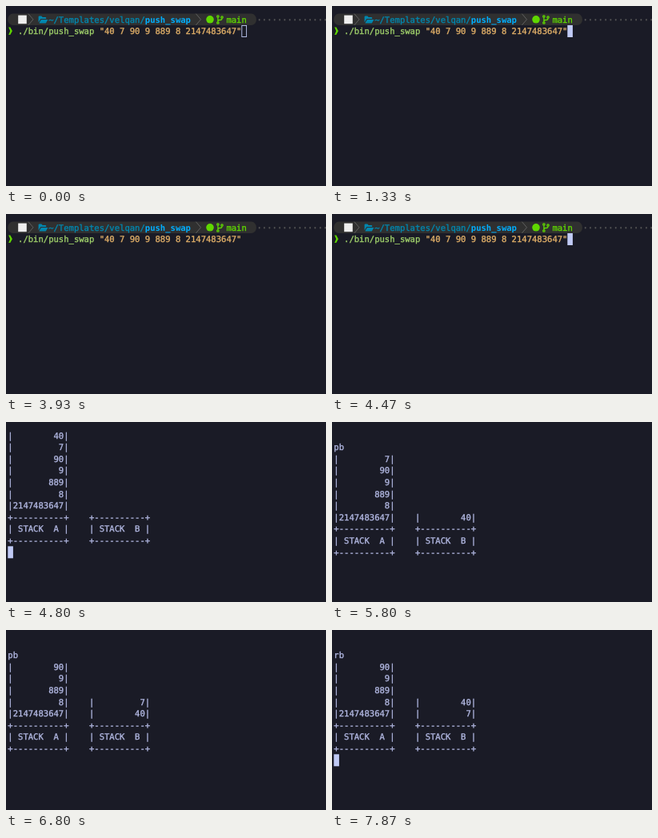
An HTML page that plays this animation: 400 by 225 pixels, repeating every 8000 ms.

```html
<!DOCTYPE html>
<html lang="en">
<head>
<meta charset="utf-8">
<title>push_swap in a terminal</title>
<style>
  html, body { margin: 0; width: 100%; height: 100%; overflow: hidden; background: #1a1b26; }
  svg { display: block; width: 100vw; height: 100vh; }
  text {
    font: 10.55px "DejaVu Sans Mono", "Noto Sans Mono", monospace;
    color: #b2b8e2;
    stroke: currentColor;
    stroke-width: .35;
    text-rendering: geometricPrecision;
  }
  text, path { fill: currentColor; }
  .path { color: #0087af; }
  .dir { color: #00afff; font-weight: bold; stroke: none; }
  .git { color: #5fd700; }
  .cmd { color: #9ece6a; }
  .str { color: #e0af68; }
  .dot { color: #585858; }
  .line { fill: none; stroke: currentColor; stroke-width: 1.3; }
  .sep { fill: none; stroke: #6c6c6c; stroke-width: .8; }
  .cursor { fill: #c0caf5; }
  .hollow { fill: none; stroke: #c0caf5; stroke-width: .9; }

  .scene, .blink { opacity: 0; animation: 8s step-end infinite; }
  #prompt { animation-name: prompt; }
  #step0 { animation-name: step0; }
  #step1 { animation-name: step1; }
  #step2 { animation-name: step2; }
  #step3 { animation-name: step3; }
  #idle { animation-name: idle; }
  #typing { animation-name: typing; }
  #upper { animation-name: upper; }
  #lower { animation-name: lower; }

  @keyframes prompt { 0% { opacity: 1 } 60%, 100% { opacity: 0 } }
  @keyframes step0 { 0%, 72.5%, 100% { opacity: 0 } 60% { opacity: 1 } }
  @keyframes step1 { 0%, 85%, 100% { opacity: 0 } 72.5% { opacity: 1 } }
  @keyframes step2 { 0%, 97.5%, 100% { opacity: 0 } 85% { opacity: 1 } }
  @keyframes step3 { 0% { opacity: 0 } 97.5%, 100% { opacity: 1 } }
  @keyframes idle { 0% { opacity: 1 } 16.625%, 100% { opacity: 0 } }
  @keyframes typing {
    0%, 24.125%, 36.625%, 49.125%, 60%, 100% { opacity: 0 }
    16.625%, 30.875%, 43.375%, 55.875% { opacity: 1 }
  }
  @keyframes upper {
    0%, 67.5%, 92.5% { opacity: 0 }
    60%, 85.875%, 98.375%, 100% { opacity: 1 }
  }
  @keyframes lower { 0%, 80%, 100% { opacity: 0 } 73.375% { opacity: 1 } }
</style>
</head>
<body>
<svg viewBox="0 0 400 225" preserveAspectRatio="none">
  <rect width="400" height="225" fill="#1a1b26"/>
  <g id="prompt" class="scene">
    <rect x="2.2" y="9.5" width="310.8" height="14.6" rx="6.35" ry="7.3" fill="#303030"/>
    <rect x="15.2" y="11.6" width="10.6" height="10.6" fill="#eeeeee"/>
    <path class="sep" d="M27.9 9.7 34 16.8 27.9 23.9M237.4 9.7 243.5 16.8 237.4 23.9"/>
    <path class="path" d="M40.6 20.4V13.6q0-1 1-1h2.7l1.3 1.4h3.6q1 0 1 1v1H44q-.8 0-1.2.7zM41.3 21.6 43.6 17.4q.3-.5.9-.5h7.9l-2.3 4.1q-.3.6-.9.6z"/>
    <g class="git">
      <circle cx="255" cy="16.8" r="4.8" fill="currentColor"/>
      <path class="line" d="M264.9 14.2v5.6M270 15.3q0 2.2-2.2 2.2h-.8q-2.1 0-2.1 2"/>
      <circle class="line" cx="264.9" cy="13" r="1.2"/>
      <circle class="line" cx="264.9" cy="21" r="1.2"/>
      <circle class="line" cx="270" cy="14" r="1.2"/>
      <path d="M3.2 26.6h2.1l2.6 4.7-2.6 4.7H3.2l2-4.7z"/>
    </g>
  </g>
  <g id="step0" class="scene"></g>
  <g id="step1" class="scene"></g>
  <g id="step2" class="scene"></g>
  <g id="step3" class="scene"></g>
  <rect id="idle" class="blink hollow" x="294.8" y="24.5" width="5.8" height="14"/>
  <rect id="typing" class="blink cursor" x="294.3" y="24" width="6.6" height="15"/>
  <rect id="upper" class="blink cursor" x="2.3" y="155.3" width="6.6" height="15"/>
  <rect id="lower" class="blink cursor" x="2.3" y="169.9" width="6.6" height="15"/>
</svg>
<script>
  const LEFT = 2.35, CELL = 6.35, BASE = 20.5, LINE = 14.6;

  // Places each word on the terminal's character grid.
  function put(id, row, col, line, style = '') {
    for (const word of line.matchAll(/\S+/g)) {
      const el = document.createElementNS('http://www.w3.org/2000/svg', 'text');
      el.setAttribute('x', LEFT + (col + word.index) * CELL);
      el.setAttribute('y', BASE + row * LINE);
      el.setAttribute('class', style);
      el.textContent = word[0];
      document.getElementById(id).append(el);
    }
  }

  function drawStacks(id, op, a, b) {
    let row = op ? 2 : 0;
    if (op) put(id, 1, 0, op);
    const cell = n => '|' + String(n).padStart(10) + '|';
    a.forEach((n, i) => {
      put(id, row, 0, cell(n));
      const j = i - a.length + b.length;
      if (j >= 0) put(id, row, 16, cell(b[j]));
      row++;
    });
    const rule = '+' + '-'.repeat(10) + '+';
    for (const [col, name] of [[0, 'A'], [16, 'B']]) {
      put(id, row, col, rule);
      put(id, row + 1, col, `| STACK  ${name} |`);
      put(id, row + 2, col, rule);
    }
  }

  put('prompt', 0, 8, '~/Templates/velqan/', 'path');
  put('prompt', 0, 27, 'push_swap', 'dir');
  put('prompt', 0, 43, 'main', 'git');
  put('prompt', 0, 49, '·'.repeat(14), 'dot');
  put('prompt', 1, 2, './bin/push_swap', 'cmd');
  put('prompt', 1, 18, '"40 7 90 9 889 8 2147483647"', 'str');

  const a = [40, 7, 90, 9, 889, 8, 2147483647], b = [];
  const ops = {
    pb: () => b.unshift(a.shift()),
    rb: () => b.push(b.shift())
  };
  ['', 'pb', 'pb', 'rb'].forEach((op, i) => {
    if (op) ops[op]();
    drawStacks('step' + i, op, a, b);
  });
</script>
</body>
</html>
```
